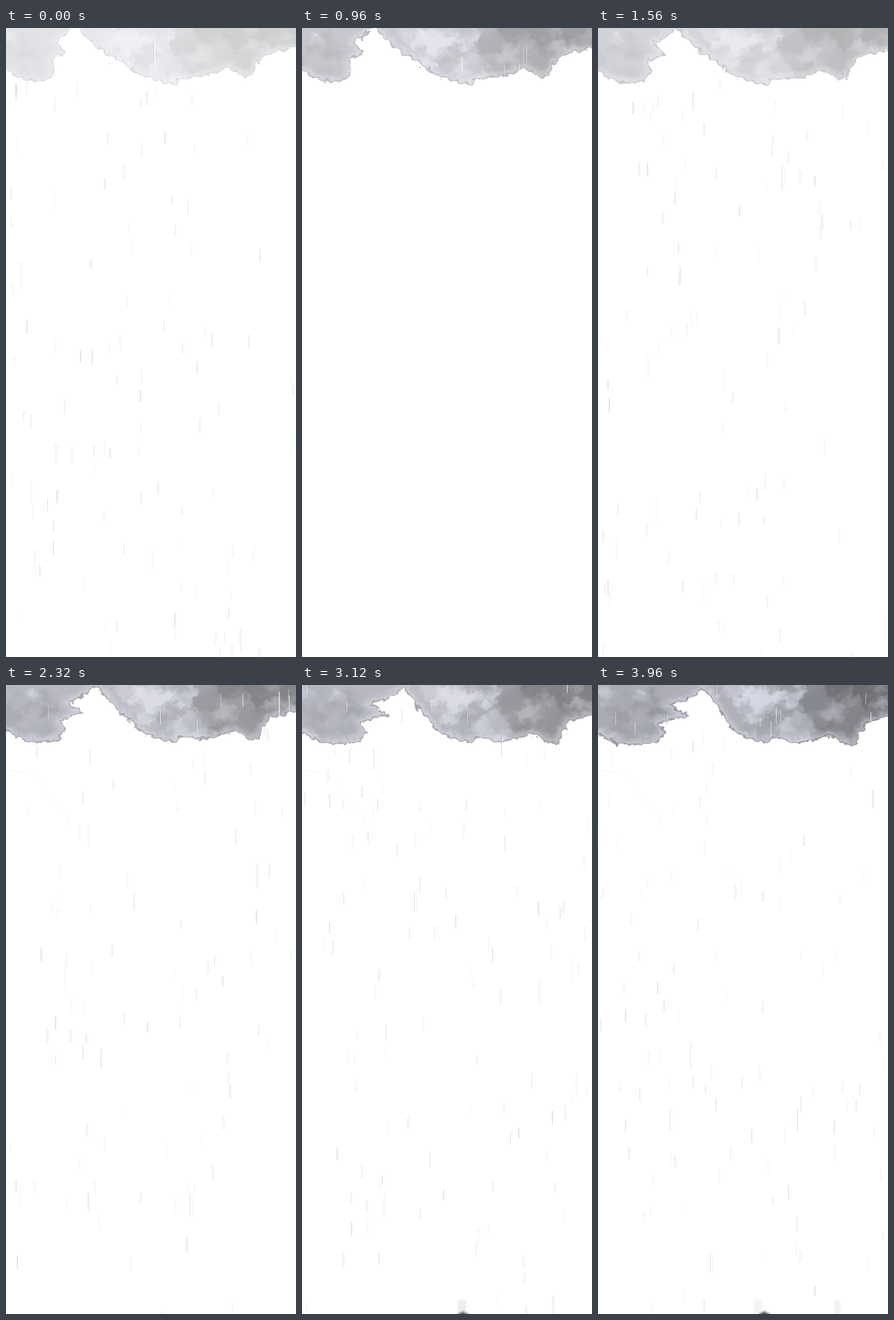
Animation of 450x974 px, one loop 4000 ms. Source, as an HTML page:

```html
<!DOCTYPE html>
<html lang="en">
<head>
<meta charset="utf-8">
<title>Rain cloud</title>
<style>
  html, body { margin: 0; width: 100%; height: 100%; overflow: hidden; background: #fff; }
  svg { display: block; width: 100%; height: 100%; }
  .clear .edge { display: none; }
</style>
</head>
<body>
<svg id="stage" viewBox="0 0 450 974">
  <defs>
    <linearGradient id="base">
      <stop offset="0" stop-color="#a9aab3"/>
      <stop offset=".5" stop-color="#b0b1bb"/>
      <stop offset=".7" stop-color="#8e8f95"/>
      <stop offset="1" stop-color="#77787d"/>
    </linearGradient>
    <filter id="soft" filterUnits="userSpaceOnUse" x="-110" y="-40" width="620" height="170" color-interpolation-filters="sRGB">
      <feGaussianBlur stdDeviation="3.5" result="b"/>
      <feTurbulence type="fractalNoise" baseFrequency=".05" numOctaves="3" seed="8"/>
      <feDisplacementMap in="b" scale="28" xChannelSelector="R" yChannelSelector="G"/>
    </filter>
    <filter id="rough" filterUnits="userSpaceOnUse" x="-30" y="-30" width="510" height="160" color-interpolation-filters="sRGB">
      <feTurbulence type="fractalNoise" baseFrequency=".11" numOctaves="2" seed="3" result="n"/>
      <feDisplacementMap in="SourceGraphic" in2="n" scale="12" xChannelSelector="R" yChannelSelector="G"/>
    </filter>
    <filter id="glow" filterUnits="userSpaceOnUse" x="-30" y="-30" width="510" height="160">
      <feGaussianBlur stdDeviation="4"/>
    </filter>
    <filter id="haze" x="-50%" y="-50%" width="200%" height="200%">
      <feGaussianBlur stdDeviation="1.4"/>
    </filter>
    <path id="outline"/>
    <clipPath id="inside"><use href="#outline"/></clipPath>
  </defs>
  <path id="arc" d="M0 133C25 133 42 136 53 151C68 174 76 184 90 195Q98 202 98 218" fill="none" stroke="#f6f6f6"/>
  <g id="cloud">
    <g filter="url(#rough)">
      <g clip-path="url(#inside)">
        <rect x="-30" y="-30" width="510" height="150" fill="url(#base)"/>
        <g id="puffs" filter="url(#soft)"></g>
        <use href="#outline" fill="none" stroke="#dcdde8" stroke-width="12" opacity=".6" filter="url(#glow)"/>
      </g>
      <use href="#outline" fill="none" stroke="#808186" stroke-width="2.2" stroke-linejoin="round" opacity=".7"/>
      <ellipse id="scrap" cx="27" cy="90" rx="5" ry="4" fill="#9b9ca2"/>
    </g>
    <ellipse id="speck" rx="1.8" ry="1" fill="#a5a6ab"/>
  </g>
  <g id="rain"></g>
  <g filter="url(#haze)">
    <rect id="mistA" x="242" y="952" width="13" height="24" fill="#ededed"/>
    <rect id="mistB" x="367" y="953" width="9" height="24" fill="#f1f1f1"/>
    <path id="bump" d="M-9 6L-7 1L-2 -1L1 -3L3 0L8 1L10 6Z" fill="#3c3c3c"/>
  </g>
</svg>
<script>
const LOOP = 4, STEP = 0.04, W = 450, H = 974;
const $ = id => document.getElementById(id);
const add = (parent, tag, attrs) => {
  const el = document.createElementNS('http://www.w3.org/2000/svg', tag);
  for (const k in attrs) el.setAttribute(k, attrs[k]);
  return parent.appendChild(el);
};
const set = (id, attrs) => {
  for (const k in attrs) $(id).setAttribute(k, attrs[k]);
};
const clamp = v => Math.max(0, Math.min(1, v));
const smooth = (from, to, v) => {
  const p = clamp((v - from) / (to - from));
  return p * p * (3 - 2 * p);
};
const bell = (v, mid, width) => Math.exp(-(((v - mid) / width) ** 2));

let seed = 41;
const rand = () => (seed = (seed * 16807) % 2147483647) / 2147483647;
const between = (a, b) => a + (b - a) * rand();

// Lower edge of the cloud; the filter adds the small scallops
const rim = [[0, 66], [22, 77], [46, 83], [70, 78], [75, 64], [71, 49], [92, 37], [78, 20], [90, 14], [106, -2],
  [110, -2], [120, 10], [146, 33], [182, 52], [215, 77], [262, 87], [268, 79], [300, 75], [322, 70], [345, 60],
  [368, 75], [383, 74], [386, 58], [403, 40], [450, 30]];

// The gap and the right tip drift right while both sides sink
function warp([x, y], p) {
  const dx = 56 * bell(x, 108, x < 108 ? 40 : 65) + 20 * bell(x, 375, 45);
  const dy = 8 * (1 - smooth(105, 130, x)) + 16 * smooth(265, 320, x) + 2;
  return [x + dx * p, y + dy * p];
}

function outlineAt(t) {
  const p = smooth(.4, 3.96, t);
  const pts = rim.map(pt => warp(pt, p).map(v => v.toFixed(1)));
  return `M-30 -30V${pts[0][1]}L${pts.join(' ')}H480V-30Z`;
}

// Darkens steadily, with a wave that dies out
const strengthAt = t => clamp(.45 + .14 * t + .23 * (1 - t / LOOP) * Math.sin(3.3 * (t - .15)));

const puff = (cx, cy, rx, ry, fill, opacity) => add($('puffs'), 'ellipse', { cx, cy, rx, ry, fill, opacity });
puff(395, 4, 110, 28, '#6a6b6f', .8);
puff(275, 26, 24, 16, '#85868d', .7);
puff(205, 23, 46, 21, '#dadbe7', .9);
puff(245, 64, 34, 13, '#d6d7e2', .7);
for (let i = 0; i < 75; i++) {
  const x = between(-65, W), right = x > 270, light = rand() < (right ? .35 : .55);
  const fill = light ? (right ? '#b3b4bb' : '#e0e1ec') : (right ? '#6e6f74' : '#8f9099');
  puff(x, between(0, 85), between(7, 20), between(4, 11), fill, between(.3, .65));
}

// Longer drops fall faster
const drops = Array.from({ length: 290 }, () => {
  const len = 14 + 8 * rand() + 24 * rand() ** 8;
  const speed = 22.7 * len - 68;
  const g = add($('rain'), 'g');
  const w = len > 28 ? 2 : 1;
  const bar = (x, width, fill, opacity, name) =>
    add(g, 'rect', { x, y: -len / 2, width, height: len, fill, opacity, class: name });
  bar(0, w, '#fff', between(.4, .85), 'core');
  bar(-1, 1, '#444', .03 + .2 * rand() ** 2, 'edge');
  bar(w, 1, '#444', between(.01, .07), 'edge');
  return { g, len, speed, x: Math.floor(rand() * W), y: H - rand() * (H + 50 + LOOP * speed) };
});

function draw(t) {
  set('outline', { d: outlineAt(t) });
  set('puffs', { transform: `translate(${15 * t} 0)` });
  set('cloud', { opacity: strengthAt(t) });
  set('speck', { cx: 161 + 23 * t, cy: 55 + 6 * t, opacity: clamp((1.4 - t) * 3) });
  set('scrap', { opacity: smooth(3.3, 3.6, t) });
  set('arc', { opacity: smooth(2, 2.3, t) });

  for (const { g, x, y, len, speed } of drops) {
    const now = y + speed * t;
    const seen = now > -len && now < H + len;
    g.setAttribute('display', seen ? 'inline' : 'none');
    if (seen) g.setAttribute('transform', `translate(${x} ${now.toFixed(1)})`);
  }
  // For a moment the drops lose their shadows
  $('stage').classList.toggle('clear', t > .9 && t < 1.02);

  const grow = smooth(2, 3.2, t);
  set('bump', {
    transform: `translate(${(242 + 9.5 * (t - 2.32)).toFixed(1)} ${(975 - 3 * grow).toFixed(1)})`,
    opacity: smooth(2.1, 3.3, t) * .85
  });
  set('mistA', { opacity: smooth(2.6, 3.1, t) * (1 - .4 * smooth(3.1, 3.9, t)) });
  set('mistB', { opacity: smooth(3.5, 3.9, t) });
}

function tick() {
  const t = (performance.now() / 1000) % LOOP;
  draw(Math.floor(t / STEP + 1e-6) * STEP);
  requestAnimationFrame(tick);
}
draw(0);
requestAnimationFrame(tick);
</script>
</body>
</html>
```
